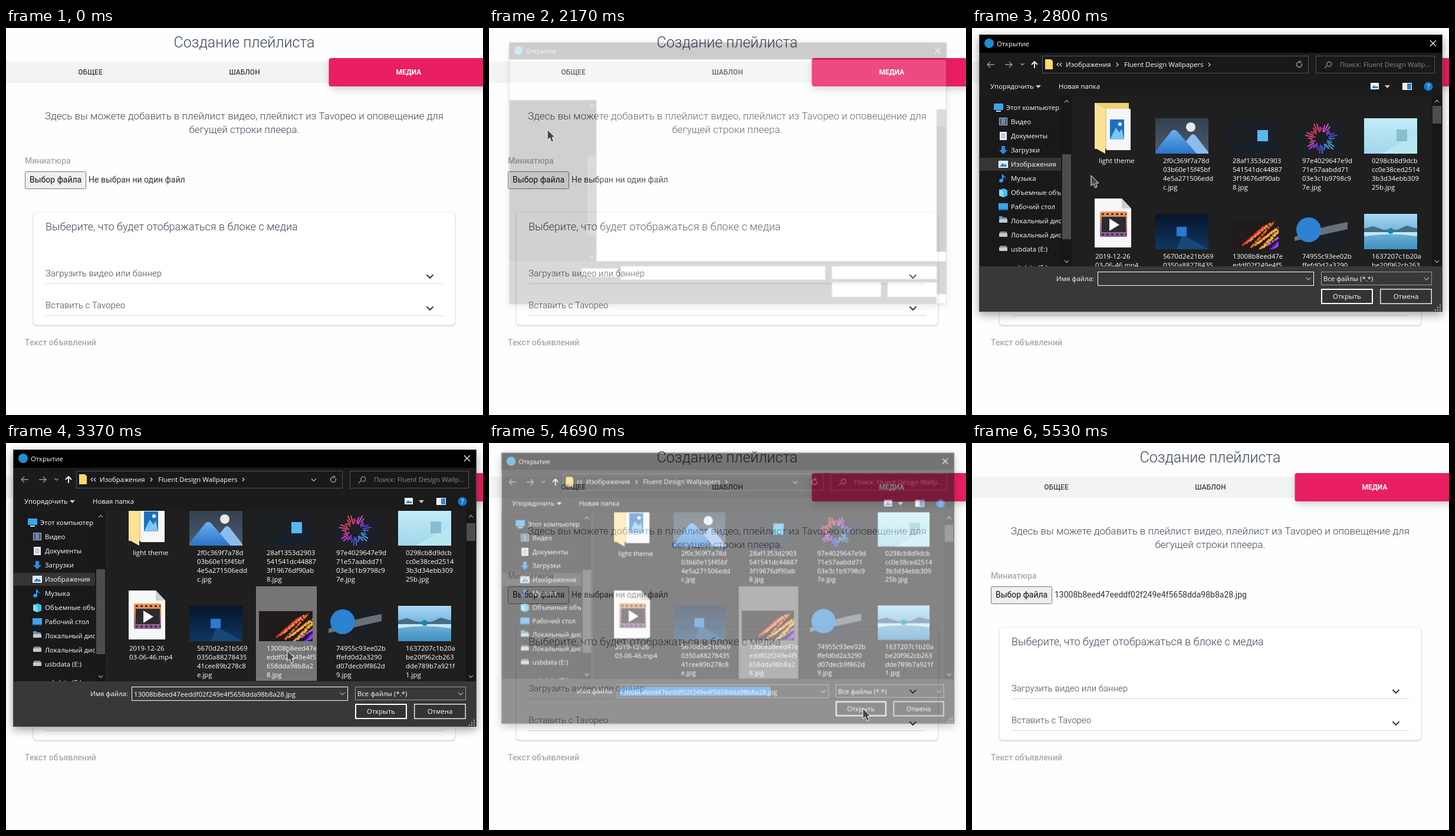
These frames come from a looping animation (809 px wide and 656 px high, 5590 ms). An HTML page:

```html
<!DOCTYPE html>
<html lang="ru">
<head>
<meta charset="utf-8">
<title>Создание плейлиста</title>
<style>
html, body { margin: 0; width: 100%; height: 100%; overflow: hidden; background: #fefefe; }
#stage { display: block; width: 809px; height: 656px; font-family: Roboto, sans-serif; }
#stage text { white-space: pre; }
.light { font-weight: 300; fill: #3c4858; }
.mid { text-anchor: middle; }
.tab { font-size: 12px; font-weight: 500; fill: #444; text-anchor: middle; }
.label { font-size: 14px; font-weight: 500; fill: #aaa; }
.field { font-size: 14px; fill: #333; }
.ui { font: 11.4px "Open Sans", "Noto Sans", sans-serif; fill: #fff; }
.line { fill: none; stroke-width: 1.2; }
#dialog { transform-origin: 405px 246px; }
</style>
</head>
<body>
<svg id="stage" viewBox="0 0 809 656"></svg>
<script>
const LOOP = 5590;
const FILE = '13008b8eed47eeddf02f249e4f5658dda98b8a28.jpg';

const text = (x, y, s, cls, extra = '') => `<text x="${x}" y="${y}" class="${cls}" ${extra}>${s}</text>`;
const rect = (x, y, w, h, fill, extra = '') => `<rect x="${x}" y="${y}" width="${w}" height="${h}" fill="${fill}" ${extra}/>`;
const disc = (x, y, r, fill, extra = '') => `<circle cx="${x}" cy="${y}" r="${r}" fill="${fill}" ${extra}/>`;
const shape = (d, fill) => `<path d="${d}" fill="${fill}"/>`;
const line = (d, color = '#ddd', width = 1.2) => `<path d="${d}" class="line" stroke="${color}" style="stroke-width:${width}"/>`;
const group = (id, body) => `<g id="${id}">${body}</g>`;
const clip = (x, y, w, h, body) => `<svg x="${x}" y="${y}" width="${w}" height="${h}" viewBox="${x} ${y} ${w} ${h}">${body}</svg>`;
const chevron = (x, y, r, color, width) => line(`M${x - r} ${y - r / 2}l${r} ${r} ${r} ${-r}`, color, width);
const frame = (x, y, w, h, fill, stroke, width = 1) =>
  rect(x + width / 2, y + width / 2, w - width, h - width, fill, `stroke="${stroke}" stroke-width="${width}"`);
const gradient = (id, from, to) =>
  `<linearGradient id="${id}" x2="0" y2="1"><stop stop-color="${from}"/><stop offset="1" stop-color="${to}"/></linearGradient>`;

const defs = `<defs>
  <filter id="soft" x="-20%" y="-20%" width="140%" height="150%"><feGaussianBlur stdDeviation="8"/></filter>
  <filter id="thin" x="-5%" y="-10%" width="110%" height="120%"><feGaussianBlur stdDeviation="1.5"/></filter>
  ${gradient('dusk', '#33414f', '#4d5b70')}${gradient('hill', '#6ab0f0', '#2a73c8')}
  ${gradient('night', '#07142b', '#0f3763')}${gradient('ice', '#c4ecf8', '#9fd6ea')}
  ${gradient('lake', '#a9d9f5', '#3f8fc0')}${gradient('film', '#f59a4a', '#84599c')}</defs>`;

function page() {
  const row = (y, s) => text(67, y, s, 'light', 'font-size="15"') +
    rect(67, y + 12, 674, 1, '#d6d6d6') + chevron(719, y, 5.5, '#333', 2);
  const button = (fill, stroke) => frame(32, 243, 104, 30, fill, stroke).replace('/>', ' rx="2"/>');
  return rect(0, 0, 809, 656, '#fefefe') +
    text(404, 33, 'Создание плейлиста', 'light mid', 'font-size="25"') +
    rect(0, 57, 809, 36, '#f2f3f3') +
    rect(550, 58, 270, 44, '#000', 'opacity=".22" filter="url(#soft)"') +
    rect(547.5, 51, 270, 48, '#e91e63', 'rx="4"') +
    text(143, 79, 'ОБЩЕЕ', 'tab') + text(404.5, 79, 'ШАБЛОН', 'tab') +
    text(683, 79, 'МЕДИА', 'tab', 'style="fill:#fff;font-weight:700"') +
    text(404, 155, 'Здесь вы можете добавить в плейлист видео, плейлист из Tavopeo и оповещение для', 'light mid', 'font-size="17"') +
    text(404, 178, 'бегущей строки плеера.', 'light mid', 'font-size="17"') +
    text(32, 230, 'Миниатюра', 'label') +
    button('#efefef', '#767676') + group('hover', button('#e5e5e5', '#4f4f4f')) + group('press', button('#f5f5f5', '#8d8d8d')) +
    text(40, 262, 'Выбор файла', 'field', 'style="fill:#111"') +
    group('empty', text(140, 262, 'Не выбран ни один файл', 'field')) +
    group('chosen', text(140, 262, FILE, 'field')) +
    rect(46, 313, 716, 192, '#000', 'rx="6" opacity=".2" filter="url(#thin)"') +
    rect(46.5, 312.5, 715, 191, '#fff', 'rx="6"') +
    text(67, 343, 'Выберите, что будет отображаться в блоке с медиа', 'light', 'font-size="18"') +
    row(421, 'Загрузить видео или баннер') + row(475, 'Вставить с Tavopeo') +
    text(32, 538, 'Текст объявлений', 'label') +
    group('tip', frame(83, 271, 154, 24, '#4b4b4b', '#5c5c5c') + text(90, 287, 'Не выбран ни один файл', 'ui'));
}

function windowFrame() {
  const holes = [[143, 417, 65, 15], [213, 413, 367, 24], [592, 413, 188, 23], [592, 442, 88, 26], [692, 442, 88, 26], [780, 463, 17, 17]];
  return rect(12, 16, 786, 470, '#000', 'opacity=".38" filter="url(#soft)"') +
    rect(12, 11, 786, 470, '#4a4a4a') + rect(13, 12, 784, 30, '#000') +
    disc(29, 26, 8, '#1f8fd0') + text(42, 31, 'Открытие', 'ui') +
    line('M777 21l10 10M787 21l-10 10', '#fff') +
    rect(13, 42, 784, 438, '#fcfcfc') +
    rect(13, 115, 156, 289, '#191919') + rect(780, 132, 17, 255, '#171717') +
    rect(13, 404, 784, 76, '#383838') + holes.map(h => rect(...h, '#fcfcfc')).join('');
}

function toolbar() {
  return rect(13, 42, 784, 73, '#1b1b1b') +
    line('M38 62H26m5-5l-5 5 5 5M56 62h12m-5-5l5 5-5 5', '#9a9a9a', 1.4) + chevron(85.5, 61.5, 3, '#aaa') +
    line('M106 68V57m-5 5l5-5 5 5', '#fff', 1.8) +
    frame(119, 47, 452, 30, '#191919', '#535353') + frame(583, 47, 202, 30, '#191919', '#535353') +
    shape('M124 53h10l3 3v14h-13z', '#ffd96b') +
    line('M147 59l-3 3 3 3M152 59l-3 3 3 3M245 59l3 3-3 3M401 59l3 3-3 3') +
    text(159, 66, 'Изображения', 'ui') + text(258, 66, 'Fluent Design Wallpapers', 'ui') +
    group('drop', chevron(522, 62.5, 4, '#aaa', 1.4)) +
    line('M559 60a4.500 4.500 0 1 1-4-2.500m0-2l3 2-3 2', '#aaa', 1.3) +
    line('M598 68l4.500-4.500a4 4 0 1 1 1 1', '#999') +
    text(624, 66, 'Поиск: Fluent Design Wallp...', 'ui', 'style="fill:#8c8c8c"') +
    text(31, 103, 'Упорядочить', 'ui') + text(147, 103, 'Новая папка', 'ui') +
    shape('M108 97h9l-4.500 5zM700 97h9l-4.500 5z', '#ccc') +
    frame(676, 93, 14, 11, '#e9f3fb', '#fff') + shape('M678 102l4-5 3 3 2-2 2 4z', '#277bc0') +
    frame(730, 93, 16, 12, '#eee', '#fff') + rect(738, 94, 7, 10, '#2b87d0') +
    disc(774, 99, 7.5, '#1579d6') + text(774, 103, '?', 'ui mid', 'font-weight="700"');
}

function sidebar() {
  const blue = '#3ba4ec';
  const disk = rect(46, -3, 14, 6, '#c9c9c9', 'rx="1"') + shape('M48-6h10l2 3H46z', '#8c8c8c');
  const icons = {
    pc: rect(37, -7, 16, 11, blue) + rect(41, 5, 8, 2, '#ddd'),
    video: frame(46, -7, 14, 13, '#555', '#bbb') + rect(50, -5, 6, 9, '#5a8fd0'),
    doc: rect(47, -7, 12, 14, '#f4f4f4') + line('M49-3h8M49 0h8M49 3h8', '#3f86c5'),
    down: shape('M50-7h6v7h4l-7 7-7-7h4z', '#2f8be0'),
    image: frame(45, -6, 16, 12, '#d9ecfa', '#fff') + shape('M47 4l5-6 3 3 2-2 2 5z', '#2e86c9'),
    music: shape('M51-7h2c0 4 5 4 5 8-1-2-3-3-5-3v6a3.500 3 0 1 1-2-3z', '#2ba0f2'),
    cube: shape('M46-5l8-2 6 3v9l-6 3-8-3z', '#45bfe8') + shape('M46-5l7 3v10l-7-3z', '#8bdcf4'),
    desk: rect(45, -6, 16, 12, blue) + rect(45, 4, 16, 2, '#176cae'),
    system: disk + rect(46, -8, 6, 4, blue), disk
  };
  const items = [['pc', 'Этот компьютер'], ['video', 'Видео'], ['doc', 'Документы'], ['down', 'Загрузки'],
    ['image', 'Изображения'], ['music', 'Музыка'], ['cube', 'Объемные объекты'], ['desk', 'Рабочий стол'],
    ['system', 'Локальный диск (C:)'], ['disk', 'Локальный диск (D:)'], ['disk', 'usbdata (E:)']];
  const rows = items.map(([icon, name], i) =>
    `<g transform="translate(0 ${135 + i * 24})">${icons[icon]}${text(i ? 66 : 58, 4, name, 'ui')}</g>`).join('');
  return clip(13, 115, 138, 289, rect(13, 220, 138, 22, '#353535') + rows + text(66, 410, 'usbdata (E:)', 'ui'));
}

function fileList() {
  const blank = rect(0, 0, 90, 60, '#1c1f24');
  const burst = Array.from({ length: 34 }, (_, i) => {
    const a = i * Math.PI / 17, near = 13 + 3 * Math.sin(i * 2), far = 23 + 5 * Math.sin(i * 5);
    const at = r => `${45 + r * Math.cos(a)} ${25 + r * Math.sin(a)}`;
    return line(`M${at(near)}L${at(far)}`, `hsl(${280 + 75 * Math.cos(a + 2.4)} 75% 58%)`, 2);
  }).join('');
  const stripes = Array.from({ length: 12 }, (_, i) =>
    `<path d="M${34 + i * 5} ${53 - i % 3 * 5}L${62 + i * 5} ${12 - i % 4 * 4}" transform="rotate(14 65 30)" class="line"
      stroke="hsl(${i < 8 ? 8 + i * 5 : 345 - i * 8} 85% ${48 + i % 3 * 8}%)" stroke-dasharray="9 2 4 1" style="stroke-width:3.500"/>`).join('');
  const sun = disc(60, 15, 8, '#e8e8e8');
  const art = [
    rect(0, 0, 90, 60, 'url(#dusk)') + sun + shape('M35 60l25-31q4-4 8 0l24 31z', '#8bbcec') + shape('M0 56l27-34q5-5 10 0l33 38H0z', 'url(#hill)'),
    blank + shape('M15 60l48-40 27 24v16z', '#17212e') + rect(55, 20, 18, 19, '#56b9ee'),
    blank + burst,
    rect(0, 0, 90, 60, 'url(#ice)') + shape('M30 60l60-35v35z', '#b8e7f2') + rect(55, 19, 18, 20, '#88bdcd'),
    rect(0, 0, 90, 60, 'url(#night)') + shape('M36 60l10-25 44 25z', '#174878') + rect(36, 22, 17, 16, '#287bd0'),
    rect(0, 0, 91, 60, '#201b1d') + stripes,
    blank + shape('M0 39q35-15 90-25v12L0 46z', '#68717a') + disc(24, 27, 21, '#2d82d2'),
    rect(0, 0, 90, 60, 'url(#lake)') + shape('M0 25l15-4 18 6h24l15-7 18 5v6H0z', '#456d86') + shape('M0 31h90v7q-45-7-90 0z', '#c4e7f5') + disc(45, 29, 5, '#168aa5')
  ];
  const names = [
    ['2f0c369f7a78d', '03b60e15f45bf', '4e5a271506edd', 'c.jpg'], ['28af1353d2903', '541541dc44887', '3f19676df90ab', '8.jpg'],
    ['97e4029647e9d', '71e57aabdd71', '03e3c1b9798c9', '7e.jpg'], ['0298cb8d9dcb', 'cc0e38ced2514', '3b3d34ebb309', '25b.jpg'],
    ['5670d2e21b569', '0350a88278435', '41cee89b278c8', 'e.jpg'], ['13008b8eed47e', 'eddf02f249e4f5', '658dda98b8a2', '8.jpg'],
    ['74955c93ee02b', 'ffefd0d2a3290', 'd07decb9f862d', '9.jpg'], ['1637207c1b20a', 'be20f962cb263', 'dde789b7a921f', '1.jpg']];
  const caption = (x, y, lines) => lines.map((s, i) => text(x, y + i * 15, s, 'ui')).join('');
  const tiles = art.map((picture, i) => {
    const x = 311 + i % 4 * 118, y = i < 4 ? 114 : 276, cut = i === 2 || i === 5 ? 9 : 0;
    return `<svg x="${x}" y="${y + cut}" width="${i === 5 ? 91 : 90}" height="${60 - cut}">${picture}</svg>` +
      caption(x + 13, i < 4 ? 190 : 352, names[i]);
  }).join('');
  const folder = shape('M208 88h58v78h-58z', '#efd078') + rect(228, 98, 41, 70, '#f6f6f6') + rect(234, 116, 24, 34, '#1e70bd') +
    shape('M234 150l10-20 6 8 4-6 4 18z', '#7dc5f5') + disc(251, 124, 3, '#fff') + shape('M208 88l18 10v76l-18-10z', '#fbe294');
  const video = shape('M208 250h46l16 17v66h-62z', '#f7f7f7') + shape('M254 250v17h16z', '#cfcfcf') +
    rect(217, 272, 46, 43, 'url(#film)', 'rx="2"') + rect(220, 281, 41, 26, '#2c2a30') +
    line('M220 276.500h42M220 311h42', '#3a3038', 3).replace('/>', ' stroke-dasharray="4 4"/>') + shape('M233 284v21l17-10.500z', '#fff');
  const list = group('hovered', rect(424, 243, 103, 160, '#444')) + group('selected', frame(424, 243, 103, 160, '#757575', '#808080')) +
    group('passed', rect(542, 243, 103, 160, '#444')) +
    folder + text(215, 190, 'light theme', 'ui') + video + caption(209, 352, ['2019-12-26', '03-06-46.mp4']) + tiles;
  return rect(169, 115, 628, 289, '#1f1f1f') + clip(170, 115, 610, 289, group('scroll', list));
}

function footer() {
  return rect(13, 404, 784, 76, '#383838') + text(143, 429, 'Имя файла:', 'ui') +
    frame(213, 413, 367, 24, '#383838', '#9b9b9b') + group('focus', frame(213, 413, 367, 24, 'none', '#fff')) +
    group('marked', rect(217, 417, 262, 16, '#2b86df')) + group('name', text(217, 430, FILE, 'ui')) +
    frame(592, 413, 188, 23, '#383838', '#9b9b9b') + group('combo', frame(592, 413, 188, 23, '#444', '#fff')) +
    text(596, 429, 'Все файлы (*.*)', 'ui') + chevron(570.5, 425, 4, '#aaa') + chevron(771, 425, 4, '#aaa') +
    frame(592, 442, 88, 26, '#333', '#fff', 2) + group('pushed', frame(592, 442, 88, 26, '#666', '#fff', 2)) +
    frame(692, 442, 88, 26, '#333', '#e8e8e8', 1.5) +
    text(636, 459, 'Открыть', 'ui mid') + text(736, 459, 'Отмена', 'ui mid') +
    [[794, 470], [790, 474], [794, 474], [786, 478], [790, 478], [794, 478]].map(p => rect(p[0] - 1, p[1] - 1, 2, 2, '#bbb')).join('');
}

const arrows = x => line(`M${x - 3.5} 126l3.500-3.500 3.500 3.500M${x - 3.5} 394l3.500 3.500 3.500-3.500`, '#999', 1.4);
const bars = rect(152, 115, 17, 289, '#171717') + rect(153, 214, 15, 144, '#4d4d4d') + arrows(160.5);
const listBar = group('listbar', rect(780, 115, 17, 289, '#171717') + arrows(788.5)) + group('thumb', rect(781, 136, 15, 30, '#4d4d4d'));
const pointer = '<path d="M0 0V17.500L4 14 7 21 10.500 19.500 8 13H13Z" fill="#474747" stroke="#fff" stroke-linejoin="round"/>';

document.getElementById('stage').innerHTML = defs + page() +
  group('dialog', windowFrame() + group('tools', toolbar()) + group('side', sidebar()) + bars +
    group('files', fileList()) + listBar + group('foot', footer())) + group('cursor', pointer);

let rules = '';
function animate(id, stops, timing = 'linear') {
  const frames = stops.map(([t, css]) => `${(t / LOOP * 100).toFixed(4)}%{${css}}`).join('');
  rules += `@keyframes k-${id}{${frames}}#${id}{animation:k-${id} ${LOOP}ms ${timing} infinite}`;
}
const show = (id, from, to = LOOP) => animate(id, [
  ...(from ? [[0, 'opacity:0']] : []), [from, 'opacity:1'], [to, 'opacity:0']], 'step-end');
const pose = (opacity, scale) => `opacity:${opacity};transform:scale(${scale})`;

show('hover', 820, 1780);
show('press', 1390, 1540);
animate('tip', [[0, 'opacity:0'], [1030, 'opacity:0'], [1120, 'opacity:1'], [1389, 'opacity:1'], [1390, 'opacity:0'], [LOOP, 'opacity:0']]);
show('empty', 0, 4870);
show('chosen', 4870);

animate('dialog', [[0, pose(0, .93)], [2140, pose(0, .93)], [2290, pose(.96, 1)], [2400, pose(.96, 1)], [2410, pose(1, 1)],
  [4600, pose(1, 1)], [4690, pose(.55, .978)], [4780, pose(.17, .957)], [4870, pose(0, .935)], [LOOP, pose(0, .93)]]);
show('tools', 2410);
show('side', 2470);
show('foot', 2470);
show('files', 2530);
show('listbar', 2530);
show('drop', 2860);
show('hovered', 3100, 3220);
show('selected', 3220);
show('name', 3220);
show('focus', 2470, 3880);
show('passed', 4069, 4122);
show('combo', 4209, 4268);
show('marked', 4570);
show('pushed', 4570, 4630);
animate('scroll', [[0, 'transform:translateY(39px)'], [3370, 'transform:none']], 'step-end');
animate('thumb', [[0, 'transform:translateY(-4px)'], [3370, 'transform:none']], 'step-end');

const path = [[0, 830, 50], [99, 830, 50], [100, 793, 50], [250, 793, 50], [280, 745, 78], [310, 690, 95], [340, 627, 105],
  [400, 486, 131], [430, 413, 140], [460, 383, 146], [520, 288, 178], [580, 215, 198], [640, 167, 213], [700, 135, 223],
  [790, 88, 241], [960, 71, 254], [1720, 71, 254], [2100, 98, 175], [2380, 102, 164], [2560, 140, 200], [2860, 217, 262],
  [3220, 477, 352], [3400, 477, 352], [3910, 496, 362], [4330, 634, 450], [5290, 634, 450], [5350, 641, 410],
  [5410, 690, 312], [5470, 748, 236], [5500, 783, 190], [5529, 812, 162], [LOOP, 830, 150]];
animate('cursor', path.map(([t, x, y]) => [t, `transform:translate(${x}px,${y}px)`]));

document.head.appendChild(document.createElement('style')).textContent = rules;
</script>
</body>
</html>
```
